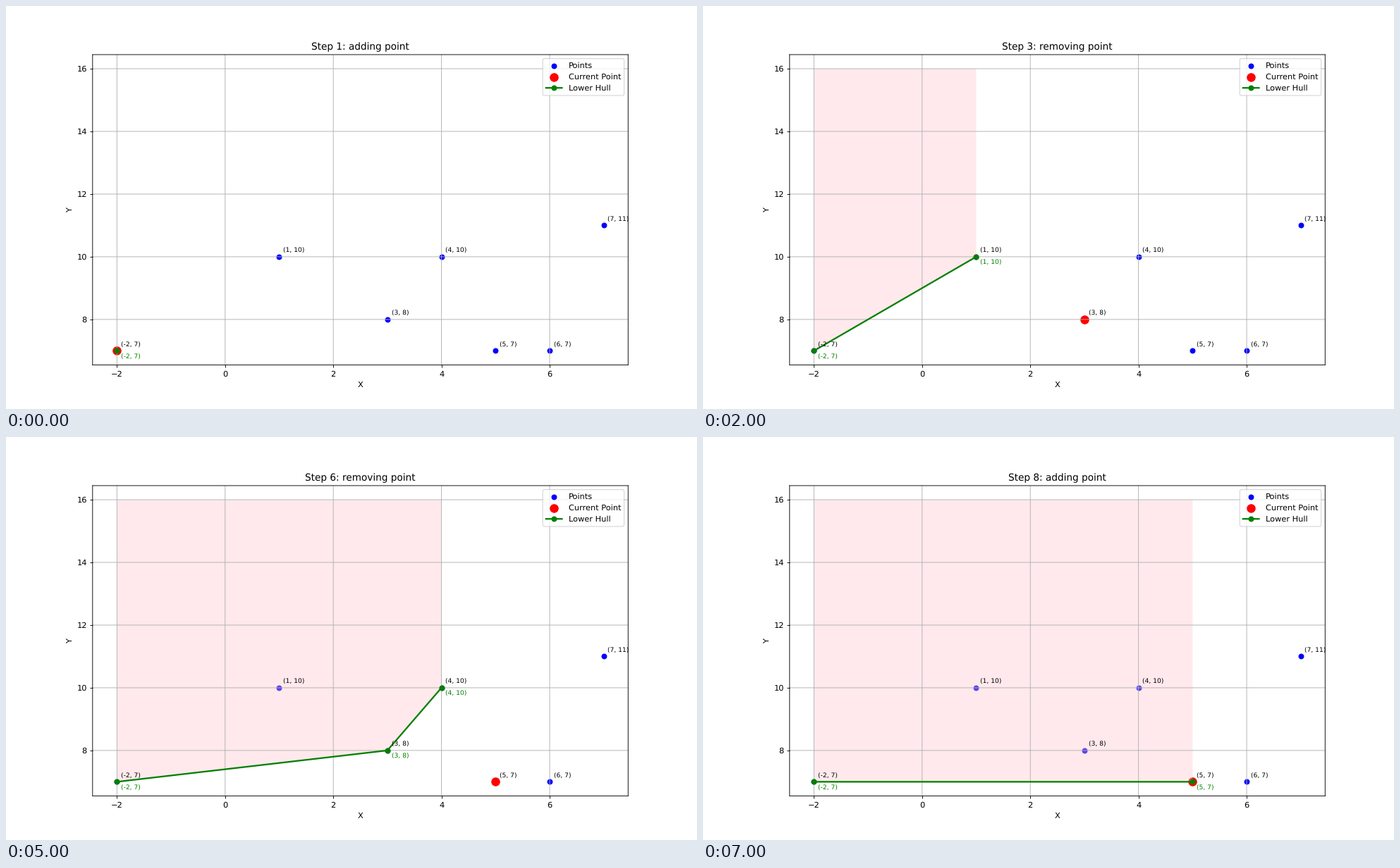
These frames come from a looping animation (980 px wide and 572 px high, 8 s). A matplotlib script:

```python
from itertools import islice

import matplotlib.pyplot as plt
from matplotlib.animation import FuncAnimation

# Soft edges: no rounding of lines or glyphs to whole pixels.
plt.rcParams.update({"path.snap": False, "text.hinting": "none"})

POINTS = sorted([(-2, 7), (1, 10), (3, 8), (4, 10), (5, 7), (6, 7), (7, 11)])
XS, YS = zip(*POINTS)
TOP = max(YS) + 5
STEPS = 8
W, H = 980, 572
DPI = W / 12


def cross(o, a, b):
    return (a[0] - o[0]) * (b[1] - o[1]) - (a[1] - o[1]) * (b[0] - o[0])


def lower_hull(points):
    """Yield (action, current point, hull) for each step of the scan."""
    hull = []
    for p in points:
        while len(hull) > 1 and cross(hull[-2], hull[-1], p) <= 0:
            yield "removing", p, list(hull)
            hull.pop()
        hull.append(p)
        yield "adding", p, list(hull)


def label(p, dy, color):
    ax.annotate(f"({p[0]}, {p[1]})", p, xytext=(5, dy),
                textcoords="offset points", fontsize=8, color=color)


def draw(i):
    action, current, hull = steps[i]
    hx, hy = zip(*hull)
    ax.clear()
    ax.scatter(XS, YS, color="blue", label="Points")
    ax.scatter(*current, color="red", s=100, label="Current Point")
    ax.plot(hx, hy, "o-", color="green", lw=2, label="Lower Hull")
    if len(hull) > 1:
        ax.fill(hx + (hx[-1], hx[0]), hy + (TOP, TOP),
                facecolor="pink", alpha=0.35, lw=0)
    for p in POINTS:
        label(p, 5, "black")
    for p in hull:
        label(p, -10, "green")
    ax.set(title=f"Step {i + 1}: {action} point", xlabel="X", ylabel="Y",
           xlim=(-2.45, 7.45), ylim=(6.55, 16.45))
    ax.grid(True)
    ax.legend(loc="upper right")


steps = list(islice(lower_hull(POINTS), STEPS))

# The tiny margin keeps the pixel size from rounding down.
fig, ax = plt.subplots(figsize=((W + 1e-6) / DPI, (H + 1e-6) / DPI), dpi=DPI)
fig.subplots_adjust(left=122.8 / W, right=882.3 / W,
                    top=1 - 69 / H, bottom=1 - 509.4 / H)
anim = FuncAnimation(fig, draw, frames=STEPS, interval=1000, repeat=True)
plt.show()
```
